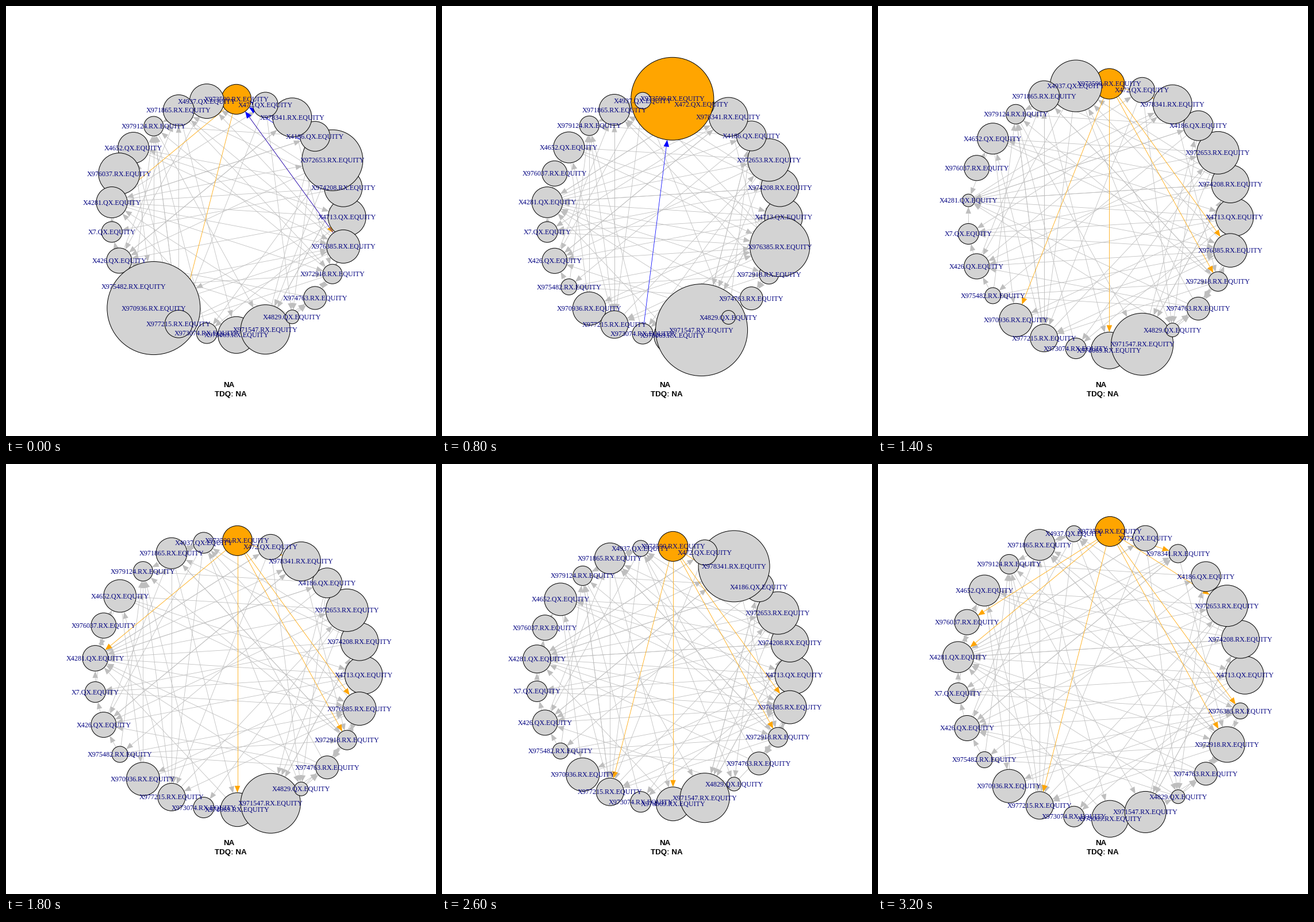
These frames come from a looping animation (748x748 px, 3400 ms). A matplotlib script:

```python
import math
import random

import matplotlib.pyplot as plt
from matplotlib.animation import FuncAnimation
from matplotlib.collections import LineCollection, PolyCollection
from matplotlib.patches import Circle

SIZE, DPI = 748, 100
PX = 72 / DPI  # points per pixel
FRAMES, INTERVAL = 17, 200
CX, CY = 387.8, 367.3
REACH = 286.4  # ring radius plus largest disc
GRAY, ORANGE, BLUE = "#bebebe", "#ffa500", "#0000ff"

CODES = """4713 974208 972653 4186 978341 472 973590 4937 971865 979124
4652 976037 4281 7 426 975482 970936 977215 973074 978069
971547 4829 974763 972918 976385""".split()
LABELS = [f"X{c}.{'RX' if len(c) == 6 else 'QX'}.EQUITY" for c in CODES]
COUNT = len(LABELS)
HUB = 6

# Usual disc radius per node, and the radius of the largest disc per step.
USUAL = [33, 33, 37, 26, 34, 22, 26, 14, 27, 17, 27, 22, 27,
         18, 22, 14, 29, 24, 18, 32, 43, 12, 20, 17, 29]
LARGEST = [81, 73, 73, 64, 80, 67, 65, 54, 47, 52, 49, 52, 46, 62, 49, 43, 36]

# Short swells: (node, step, gain).
SWELLS = [(2, 0, 16), (11, 0, 14), (7, 0, 16), (HUB, 4, 46), (24, 4, 23),
          (7, 7, 31), (12, 7, -16), (12, 11, -19), (10, 11, 10),
          (19, 11, -19), (23, 16, 14), (24, 16, -15), (4, 16, -18)]

# Coloured links of the hub: (node, first step, last step).
OUTGOING = [(12, 0, 1), (17, 0, 1), (24, 0, 1), (16, 5, 8), (19, 5, 14),
            (23, 6, 16), (24, 6, 16), (4, 7, 11), (12, 8, 11), (17, 10, 16),
            (2, 11, 16), (12, 15, 16), (4, 15, 16), (11, 16, 16)]
INCOMING = [(2, 0, 0), (5, 0, 1), (24, 0, 1), (18, 2, 4)]

POPULAR = {8, 9, 12, 14, 17, 23, 24}
CLUSTERS = [range(7, 16), range(20, 25)]


def largest_node(step):
    if step < 4:
        return 16
    return 4 if step == 13 else 20


def disc_radii(step):
    radii = list(USUAL)
    for node, peak, gain in SWELLS:
        radii[node] += gain * math.exp(-(step - peak) ** 2 / 2)
    radii = [min(r, LARGEST[step]) for r in radii]
    radii[largest_node(step)] = LARGEST[step]
    return radii


def link_chance(source, target):
    gap = abs(source - target)
    gap = min(gap, COUNT - gap)
    if HUB in (source, target) or gap == 0:
        return 0
    if gap >= 6:
        return 0.42 if target in POPULAR else 0.18
    close = any(source in c and target in c for c in CLUSTERS)
    return 0.45 if close and gap <= 2 else 0


def make_links():
    rng = random.Random(12)
    return [(s, t) for s in range(COUNT) for t in range(COUNT)
            if rng.random() < link_chance(s, t)]


def active(spans, step):
    return [node for node, first, last in spans if first <= step <= last]


def arrow(start, end, r_start, r_end, length=12, half=4.8):
    """Return the clipped line and its head between two discs."""
    dx, dy = end[0] - start[0], end[1] - start[1]
    dist = math.hypot(dx, dy)
    ux, uy = dx / dist, dy / dist
    tail = (start[0] + ux * r_start, start[1] + uy * r_start)
    tip = (end[0] - ux * r_end, end[1] - uy * r_end)
    bx, by = tip[0] - ux * length, tip[1] - uy * length
    head = [tip, (bx - uy * half, by + ux * half),
            (bx + uy * half, by - ux * half)]
    return [tail, (bx, by)], head


def draw_links(links, color, points, radii, z):
    # Overlapping discs leave no room for an arrow.
    arrows = [arrow(points[s], points[t], radii[s], radii[t])
              for s, t in links
              if math.dist(points[s], points[t]) > radii[s] + radii[t]]
    if not arrows:
        return
    lines, heads = zip(*arrows)
    ax.add_collection(LineCollection(lines, colors=color,
                                     linewidths=0.8 * PX, zorder=z),
                      autolim=False)
    ax.add_collection(PolyCollection(heads, facecolors=color,
                                     edgecolors="none", zorder=z + 0.5),
                      autolim=False)


def draw(step):
    ax.clear()
    ax.set(xlim=(0, SIZE), ylim=(SIZE, 0))
    ax.axis("off")

    ring = REACH - LARGEST[step]
    angles = [2 * math.pi * i / COUNT for i in range(COUNT)]
    points = [(CX + ring * math.cos(a), CY - ring * math.sin(a))
              for a in angles]
    radii = disc_radii(step)

    rng = random.Random(step)
    gray = [link for link in LINKS if rng.random() < 0.85]
    outgoing = [(HUB, t) for t in active(OUTGOING, step)]
    incoming = [(s, HUB) for s in active(INCOMING, step)]
    draw_links(gray, GRAY, points, radii, 1)
    draw_links(outgoing, ORANGE, points, radii, 2)
    draw_links(incoming, BLUE, points, radii, 3)

    for i, (point, r) in enumerate(zip(points, radii)):
        fill = ORANGE if i == HUB else "#d3d3d3"
        ax.add_patch(Circle(point, r, facecolor=fill, edgecolor="black",
                            linewidth=PX, zorder=5 + i * 0.01))
    for (x, y), label in zip(points, LABELS):
        ax.text(x, y + 4, label, family="Liberation Serif", size=12.1 * PX,
                color="#000080", ha="center", va="baseline", zorder=6)
    for x, y, line in ((388, 663, "NA"), (390.5, 679, "TDQ: NA")):
        ax.text(x, y, line, family="Liberation Sans", weight="bold",
                size=13.4 * PX, ha="center", va="baseline", zorder=6)
    return []


LINKS = make_links()
fig = plt.figure(figsize=(SIZE / 100, SIZE / 100), dpi=DPI, facecolor="white")
ax = fig.add_axes([0, 0, 1, 1])
anim = FuncAnimation(fig, draw, frames=FRAMES, interval=INTERVAL,
                     init_func=lambda: draw(0), repeat=True, repeat_delay=0)
plt.show()
```
